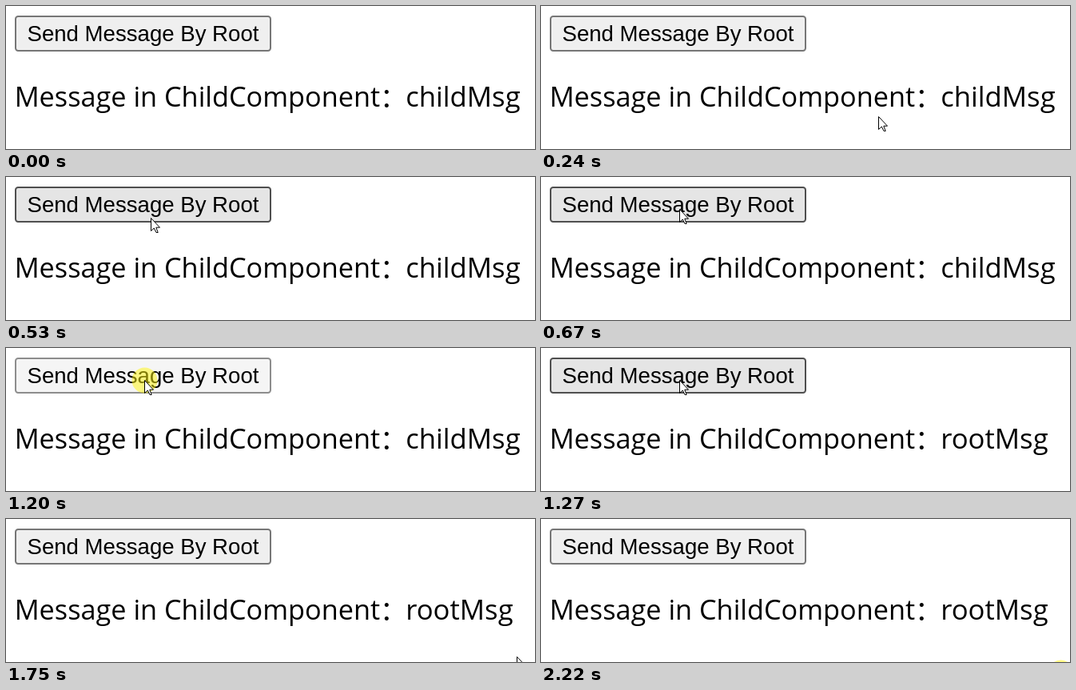
An HTML page for the animation above (2350 ms loop, 662 by 179 pixels).

```html
<!DOCTYPE html>
<html lang="en">
<head>
<meta charset="utf-8">
<style>
  html, body { margin: 0; width: 100%; height: 100%; overflow: hidden; background: #fff; }
  svg { display: block; }
  .label { font: 27.6px "Liberation Sans", Arial, sans-serif; }
  .message { font: 34.25px "Open Sans", "Noto Sans", sans-serif; }
  .colon { font: 300 33.3px "Noto Sans CJK SC", "Noto Sans CJK", sans-serif; }
  #value { font-size: 34.7px; }
</style>
</head>
<body>
<svg width="662" height="179" viewBox="0 0 662 179">
  <rect id="button" x="12" y="13" width="319" height="43" rx="3.2" stroke-width="2"/>
  <text class="label" x="26.5" y="44">Send Message By Root</text>
  <text class="message" x="10.7" y="126">Message in ChildComponent</text>
  <text class="colon" x="468" y="126" lang="zh-CN">：</text>
  <text class="message" id="value" x="500.2" y="126"></text>
  <circle id="click" r="16" fill="#fff60a" fill-opacity=".5"/>
  <path id="cursor" d="M.5.5V16.5L4.3 13L7 18.5H9.2L6.8 12.2H11.5Z" fill="#fff" stroke="#000"/>
</svg>
<script>
  const LOOP = 2350;
  const [button, value, click, cursor] =
    ["button", "value", "click", "cursor"].map(id => document.getElementById(id));
  const styles = {
    idle: ["#efefef", "#767676"],
    hover: ["#e5e5e5", "#4f4f4f"],
    active: ["#f5f5f5", "#8d8d8d"]
  };

  // The pointer is sampled about every 70 ms and rests between samples.
  function pointer(t) {
    if (t < 240) return [700, 200];
    if (t < 1400) {
      const left = 1 - Math.min(6, Math.floor((t - 240) / 71.6)) / 6;
      return [173 + 249 * left ** 3.1, 40 + 98 * left ** 2];
    }
    if (t < 1750) {
      const p = Math.floor((t - 1330) / 70) / 5;
      return [173 + 462 * p ** 0.92, 40 + 128 * p ** 1.3];
    }
    return t < 1820 ? [639, 172] : [650, 192];
  }

  function draw(t) {
    const [x, y] = pointer(t).map(Math.round);
    const pressed = (t >= 1200 && t < 1270) || t >= 2220;
    const over = x >= 11 && x < 332 && y >= 12 && y < 57;
    const [fill, stroke] = styles[over ? (pressed ? "active" : "hover") : "idle"];
    button.setAttribute("fill", fill);
    button.setAttribute("stroke", stroke);
    value.textContent = t < 1270 ? "childMsg" : "rootMsg";
    cursor.setAttribute("transform", `translate(${x} ${y})`);
    click.setAttribute("transform", `translate(${x + 0.5} ${y + 0.5})`);
    click.setAttribute("visibility", pressed ? "visible" : "hidden");
  }

  function tick() {
    draw(performance.now() % LOOP);
    requestAnimationFrame(tick);
  }
  tick();
</script>
</body>
</html>
```
